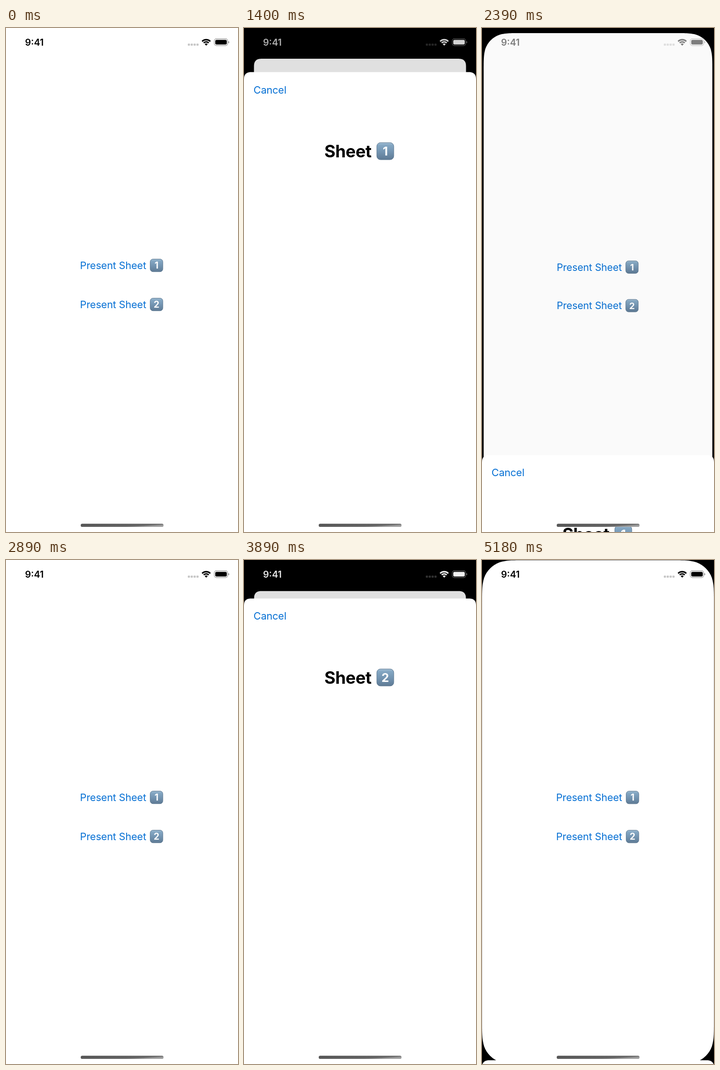
Recreate the animation shown at these times as an HTML page. Size 500 by 1083 pixels, loop 5290 ms.

```html
<!DOCTYPE html>
<html lang="en">
<head>
<meta charset="utf-8">
<title>Sheet presentation</title>
<style>
  html, body { margin: 0; width: 100%; height: 100%; overflow: hidden; background: #000; }
  svg { display: block; width: 100%; height: 100%; }
  text { font-family: Inter, "Liberation Sans", sans-serif; }
  .link { font-size: 21.8px; letter-spacing: -.006em; fill: #0670d4; }
  .title { font-size: 36.5px; font-weight: 700; letter-spacing: -.01em; }
  .clock { font-size: 20px; font-weight: 600; fill: currentColor; }
  .digit { font-weight: 700; fill: #fff; text-anchor: middle; }
</style>
</head>
<body>
<svg viewBox="0 0 500 1083">
  <defs>
    <linearGradient id="key" x1="0" y1="0" x2="0" y2="1">
      <stop offset="0" stop-color="#a3bfd4"/>
      <stop offset=".14" stop-color="#84a7c3"/>
      <stop offset=".55" stop-color="#7293b0"/>
      <stop offset="1" stop-color="#5e7a94"/>
    </linearGradient>
    <linearGradient id="bar" x1="0" y1="0" x2="1" y2=".5">
      <stop offset="0" stop-color="#525252"/>
      <stop offset=".8" stop-color="#666"/>
      <stop offset="1" stop-color="#a0a0a0"/>
    </linearGradient>
  </defs>

  <g id="card">
    <path id="cardShape" fill="#fff"/>
    <g id="link1"></g>
    <g id="link2"></g>
  </g>
  <path id="dim" d="M0 0H500V1083H0Z"/>

  <g id="sheet">
    <path id="sheetShape" fill="#fff"/>
    <text id="cancel" class="link" x="20.6" y="45.7">Cancel</text>
    <text class="title" x="173.2" y="183.3">Sheet</text>
    <g id="sheetKey"></g>
  </g>

  <g id="clock"><text class="clock" x="41" y="38">9:41</text></g>
  <g id="dots" fill="currentColor" opacity=".22"></g>
  <g id="icons" fill="currentColor">
    <g fill="none" stroke="currentColor">
      <path id="wave1" stroke-width="3.2"/>
      <path id="wave2" stroke-width="2.9"/>
    </g>
    <path d="M431.5 37.9l-3.3-3.4a4.7 4.7 0 0 1 6.6 0z"/>
    <rect x="448.9" y="23.2" width="28.9" height="14.6" rx="4.5" fill="none" stroke="currentColor" stroke-width="1.2" opacity=".42"/>
    <rect x="451" y="25.5" width="24.8" height="10" rx="2.7"/>
    <path d="M479.3 28.2q1.8.6 1.8 2.3t-1.8 2.3z" opacity=".5"/>
  </g>
  <rect x="161" y="1065.3" width="178.5" height="6.8" rx="3.4" fill="url(#bar)"/>
</svg>
<script>
const LOOP = 5290, W = 500, H = 1083;
const SHEET_TOP = 80, CARD_TOP = 67, SHRINK = .0872;
const OMEGA = .01826; // critically damped spring, per ms

// Moments at which the picture refreshes
const TICKS = [0, 930, 1100, 1200, 1290, 1390, 1490, 1600, 1690, 2140,
  2290, 2390, 2490, 2590, 2690, 2790, 3320, 3480, 3580, 3670, 3770, 3880, 3990,
  4090, 4690, 4880, 4980, 5080, 5180];

const ROUNDS = [
  { digit: 1, tap: 930, open: 1100, rise: 1051.4, cancel: 2140, close: 2290, fall: 2212, done: 2790 },
  { digit: 2, tap: 3320, open: 3480, rise: 3433.5, cancel: 4690, close: 4880, fall: 4802, done: LOOP }
];

const $ = id => document.getElementById(id);
const set = (id, name, value) => $(id).setAttribute(name, value);
const mix = (a, b, p) => a + (b - a) * p;
const clamp = v => Math.min(1, Math.max(0, v));
const spring = ms => 1 - (1 + OMEGA * ms) * Math.exp(-OMEGA * ms);

// Rectangle with continuous-curvature corners
function smoothRect(x, y, w, h, r) {
  const curve = [[1.5287, 0], [1.0885, 0], [.8684, 0], [.6315, .0749], [.3728, .1691],
    [.1691, .3728], [.0749, .6315], [0, .8684], [0, 1.0885], [0, 1.5287]];
  const back = curve.slice().reverse();
  const corner = (points, right, bottom) => {
    const at = points.map(([u, v]) =>
      (right ? x + w - u * r : x + u * r).toFixed(2) + ' ' +
      (bottom ? y + h - v * r : y + v * r).toFixed(2));
    return at[0] + 'C' + at.slice(1).join(' ');
  };
  return 'M' + corner(back, false, false) + 'L' + corner(curve, true, false) +
    'L' + corner(back, true, true) + 'L' + corner(curve, false, true) + 'Z';
}

function keycap(x, y, size, digit) {
  const mid = x + size / 2;
  return `<rect x="${x + .5}" y="${y + .5}" width="${size - 1}" height="${size - 1}" rx="${size * .21}"
      fill="url(#key)" stroke="#58748e"/>
    <text class="digit" x="${mid}" y="${y + size * .75}" font-size="${size * .69}">${digit}</text>`;
}

const link = (y, digit) =>
  `<text class="link" x="159.6" y="${y + 22}">Present Sheet</text>` + keycap(310.3, y, 28.2, digit);

function wave(r) {
  const d = r * Math.SQRT1_2;
  return `M${431.5 - d} ${37.6 - d}A${r} ${r} 0 0 1 ${431.5 + d} ${37.6 - d}`;
}

function build() {
  $('link1').innerHTML = link(496, 1);
  $('link2').innerHTML = link(580, 2);
  $('dots').innerHTML = [0, 1, 2, 3].map(i =>
    `<rect x="${391.8 + i * 6.2}" y="33.4" width="4.7" height="4.7" rx="1.4"/>`).join('');
  set('wave1', 'd', wave(12.4));
  set('wave2', 'd', wave(7.8));
  set('sheetShape', 'd', smoothRect(0, 0, W, H + 60, 13));
}

function tint(id, level) {
  const v = Math.round(255 * clamp(level));
  $(id).style.color = `rgb(${v},${v},${v})`;
}

function draw(t) {
  const round = ROUNDS[t < ROUNDS[0].done ? 0 : 1];
  const moving = t >= round.open && t < round.done;
  const closing = moving && t >= round.close;
  let p = 0, text = 0, icon = 0;
  if (closing) {
    p = 1 - spring(t - round.fall);
    text = icon = clamp(1 - (t - round.fall) / 350);
  } else if (moving) {
    p = spring(t - round.rise);
    text = clamp((t - round.rise) / 500);
    icon = Math.sqrt(text);
  }

  const scale = 1 - SHRINK * p, left = W * (1 - scale) / 2, top = CARD_TOP * p;
  const radius = moving ? mix(60, 13, p) : 0;
  set('card', 'transform', `translate(${left} ${top}) scale(${scale})`);
  set('cardShape', 'd', smoothRect(0, 0, W, H, radius / scale));
  set('dim', 'opacity', .122 * p);

  set('sheet', 'visibility', moving ? 'visible' : 'hidden');
  set('sheet', 'transform', `translate(0 ${mix(H, SHEET_TOP, p)})`);
  $('sheetKey').innerHTML = keycap(285.7, 151, 37.6, round.digit);

  const pressed = t >= round.tap && t < round.open;
  for (const n of [1, 2]) set('link' + n, 'opacity', pressed && round.digit === n ? .2 : 1);
  set('cancel', 'opacity', t >= round.cancel && t < round.close ? .2 : 1);

  tint('clock', text);
  tint('dots', text);
  tint('icons', icon);
}

let shown = -1;
function frame() {
  const now = performance.now() % LOOP;
  const tick = TICKS.filter(t => t <= now).pop();
  if (tick !== shown) draw(shown = tick);
  requestAnimationFrame(frame);
}

build();
frame();
</script>
</body>
</html>
```
